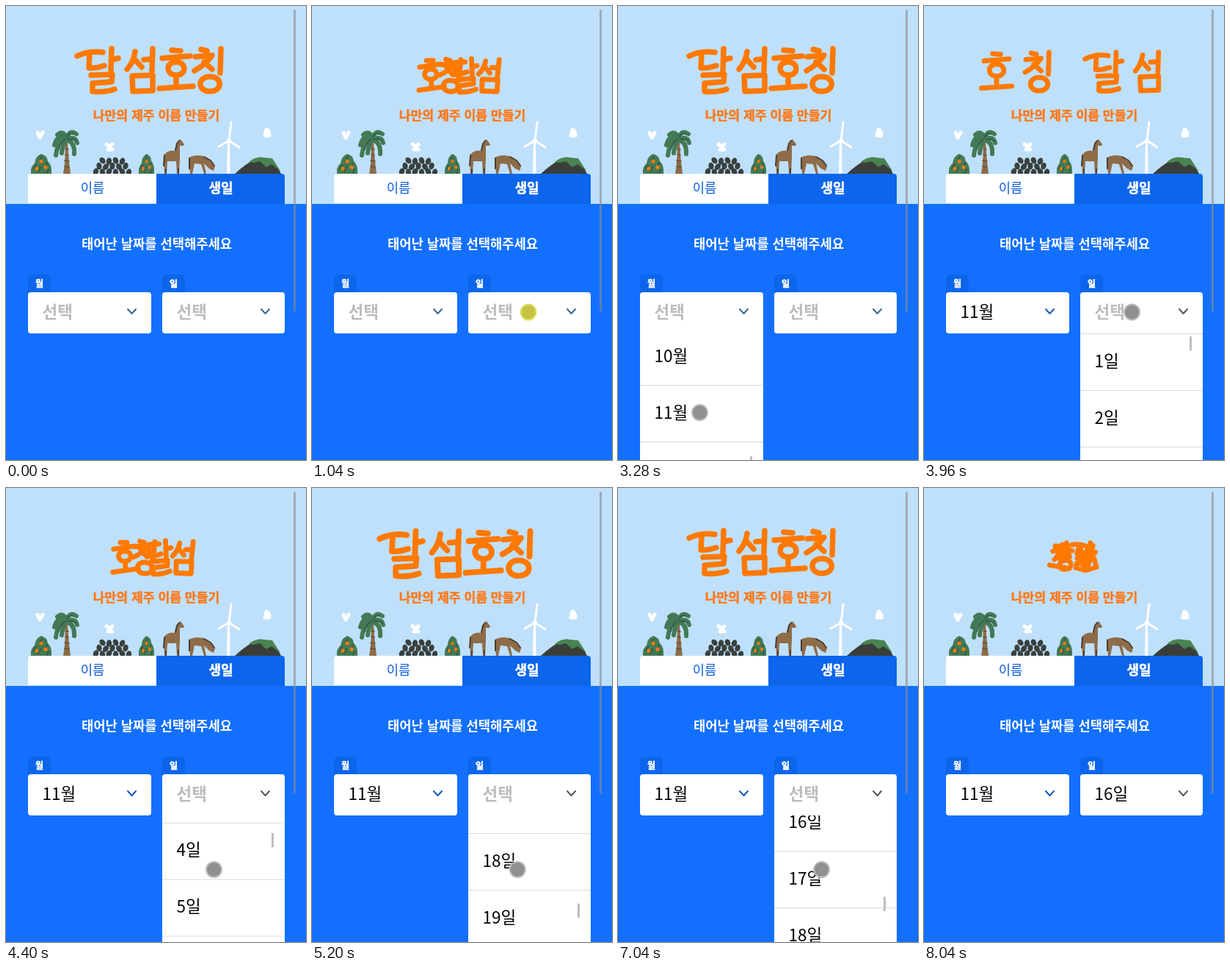
Animation, 409 px wide and 617 px high, one loop 8.24 s. Source, as an HTML page:

```html
<!DOCTYPE html>
<html lang="ko">
<head>
<meta charset="utf-8">
<title>나만의 제주 이름 만들기</title>
<style>
  html, body { margin: 0; height: 100%; overflow: hidden; background: #1370ff; }
  svg { display: block; width: 100vw; height: 100vh; }
  text {
    font: 500 22.5px 'Noto Sans CJK KR', 'Noto Sans CJK JP', 'Noto Sans CJK', sans-serif;
    dominant-baseline: central;
  }
  .mid { text-anchor: middle; }
  .heavy { font-weight: 900; stroke-width: .5; }
  .label { font-size: 12px; fill: #fff; stroke: #fff; }
  .line { fill: none; stroke-linecap: round; stroke-linejoin: round; }
</style>
</head>
<body>
<svg viewBox="0 0 409 617" preserveAspectRatio="none">
  <defs>
    <clipPath id="below"><rect y="445" width="409" height="172"/></clipPath>
    <g id="bush">
      <path fill="#437a55" d="M0 27Q-1 17 5 13Q6 3 14 0Q22 2 23 10Q29 15 28 27Z"/>
      <path class="line" stroke="#315c46" stroke-width="2" d="M7 15l-3 5M15 4l-3 5M22 12l-2 6M13 18l-3 6M24 21l-2 5"/>
      <g fill="#ff7a0a">
        <circle cx="14" cy="10" r="2.6"/><circle cx="8" cy="20" r="2.6"/><circle cx="20" cy="18" r="2.6"/>
      </g>
    </g>
  </defs>

  <rect width="409" height="269" fill="#bfe0fb"/>
  <g id="title" class="line" stroke="#ff7900"></g>
  <text class="mid heavy" x="205" y="147.500" fill="#ff7a1c" stroke="#ff7a1c" style="font-size:17.200px">나만의 제주 이름 만들기</text>

  <g id="scene">
    <g class="line" stroke="#fff" stroke-width="5">
      <path d="M43 172l3 7l4-7"/>
      <path d="M137 188l5 3l3-3M139 195h6"/>
      <path d="M355 168l-2 8h6M357 169l2 4"/>
    </g>
    <use href="#bush" x="34" y="201"/>
    <use href="#bush" transform="translate(181 201) scale(.75 1)"/>
    <path fill="#8b6c48" d="M78 228Q82 205 80 183H84Q85 207 88 228Z"/>
    <path class="line" stroke="#665139" stroke-width="1.500" d="M81 194l4 1M81 202l4 1M80 210l6 1M80 218l6 1"/>
    <path class="line" stroke="#437a55" stroke-width="6"
      d="M82 181Q71 180 68 203M82 180Q70 173 66 189M82 179Q78 168 70 175M83 179Q87 167 96 174M83 181Q95 176 97 186M83 182Q94 185 93 201M82 182Q77 188 76 200"/>
    <path class="line" stroke="#315c46" stroke-width="1.500" d="M81 181Q74 185 72 195M84 181Q91 180 96 184M83 178Q86 172 92 174"/>
    <g id="rocks" fill="#3a403d"></g>
    <path fill="#8e6c48" d="M215 203Q221 195 230 197L233 186L238 181L243 188L242 190L237 190L237 206L236 228H233L232 211H220L219 228H216Z"/>
    <path class="line" stroke="#4c3d32" stroke-width="2" d="M236 183L233 187L231 196M216 203l-1 14M235 221v6M218 222v5"/>
    <path fill="#8e6c48" d="M249 206Q262 200 274 206L285 218L283 224L277 221L270 214L273 228H270L266 215L257 214L254 228H251Z"/>
    <path class="line" stroke="#4c3d32" stroke-width="2" d="M270 205L279 210L284 217M250 207v14"/>
    <path fill="#fff" d="M302 184H305L305.500 228H301Z"/>
    <path class="line" stroke="#fff" stroke-width="3" d="M304 183L307 158M304 183L290 191M304 183L318 192"/>
    <circle cx="304" cy="183" r="3" fill="#fff"/>
    <path fill="#393e3b" d="M312 228Q328 213 344 206Q363 203 375 228Z"/>
    <path fill="#498351" d="M331 212Q341 204 350 206L363 207L374 224L362 215L355 219L346 211L338 213Z"/>
  </g>

  <path fill="#fff" d="M30 268V232q0-4 4-4H205V268Z"/>
  <path fill="#0c65eb" d="M205 269V228H376q4 0 4 4V269Z"/>
  <rect y="269" width="409" height="348" fill="#1370ff"/>
  <text class="mid" x="118" y="245.500" fill="#0c5cdc" style="font-size:17.700px">이름</text>
  <text class="mid heavy" x="293" y="245.500" fill="#fff" stroke="#fff" style="font-size:18px">생일</text>
  <text class="mid" x="205.500" y="321.500" fill="#fff" style="font-size:17.700px;font-weight:700">태어난 날짜를 선택해주세요</text>

  <g id="fields"></g>
  <rect x="392" y="5" width="3" height="410" rx="1" fill="#8a8a8a" opacity=".6"/>
  <circle id="dot" r="10.500" stroke-width="2"/>
</svg>

<script>
const LOOP = 8240, TITLE_LOOP = 3350;
const ROW = 77, LIST_TOP = 446, LIST_HEIGHT = 215;
const $ = id => document.getElementById(id);

function add(parent, tag, attrs, text = '') {
  const node = document.createElementNS('http://www.w3.org/2000/svg', tag);
  set(node, attrs);
  node.textContent = text;
  return parent.appendChild(node);
}
function set(node, attrs) {
  for (const key in attrs) node.setAttribute(key, attrs[key]);
}
const smooth = u => u * u * (3 - 2 * u);
const linear = u => u;

// Keys are [time, ...values]; values between two keys are blended.
function track(t, keys, ease = smooth) {
  if (t <= keys[0][0]) return keys[0].slice(1);
  const i = keys.findIndex(key => key[0] > t);
  if (i < 0) return keys.at(-1).slice(1);
  const a = keys[i - 1], b = keys[i];
  const u = ease((t - a[0]) / (b[0] - a[0]));
  return a.slice(1).map((v, k) => v + (b[k + 1] - v) * u);
}

// Brush lettering: 달 섬 호 칭, each in a 50 x 60 cell
const letters = [
  'M-10 10Q6 2 25 5M7 7L6 26Q16 27 27 23M37 0L36 30M37 15L46 13M9 36L38 35L37 45L11 47L11 58Q27 60 41 55',
  'M15 4Q13 18 4 28M14 14L24 25M27 15L37 14M39 0L38 30M11 37L12 58L39 57L39 36Z',
  'M19 2L31 3M6 13L44 10M25 18C10 18 11 36 25 36C40 36 39 18 25 18M25 40L25 51M2 54L48 51',
  'M13 1L21 3M5 11L28 9Q20 21 4 30M17 18L28 28M40 0L39 33M25 38C7 38 8 59 26 58C43 57 42 38 25 38'
].map(d => add($('title'), 'path', { d }));

// x of each letter, then y, scale, turn, stroke
const home = [132, 186, 232, 278, 88, 1, 0, 7.5];
const near = [238, 288, 123, 172, 90, .88, 0, 7.5];
const heap = [210, 243, 162, 190, 95, .76, -4, 9];
const knot = [219, 223, 188, 190, 94, .6, 14, 11];
const spread = (k, y) => [...home.slice(0, 4).map(x => 198 + (x - 198) * k), y, k, 0, 7.5];
const titleKeys = [
  [440, ...home],
  [620, 252, 308, 98, 156, 90, .9, 0, 7.5],
  [880, ...near], [1020, ...near],
  [1040, ...heap], [1120, ...heap],
  [1220, ...knot], [1540, ...knot],
  [1800, ...spread(1.05, 90)],
  [2360, ...spread(.95, 92)],
  [2600, ...home]
];

function drawTitle(t) {
  const pose = track(t % TITLE_LOOP, titleKeys);
  const [y, scale, turn, stroke] = pose.slice(4);
  letters.forEach((letter, i) => set(letter, {
    transform: `translate(${pose[i]} ${y}) rotate(${i % 2 ? -turn : turn}) scale(${scale}) translate(-25 -30)`,
    'stroke-width': stroke
  }));
}

[4, 5, 6].forEach((count, row) => {
  for (let i = 0; i < count; i++) {
    const x = 145 + (i - (count - 1) / 2) * 9, y = 210 + row * 7.5 + i % 2;
    add($('rocks'), 'ellipse', { cx: x, cy: y, rx: 3.6, ry: 4.8, transform: `rotate(${(i * 47 + row * 30) % 80 - 40} ${x} ${y})` });
  }
});

function makeField({ x, width, unit, count, ...timing }) {
  const root = $('fields'), right = x + width;
  add(root, 'path', { d: `M${x} 390V371q0-6 6-6h19q6 0 6 6V390Z`, fill: '#0c65eb' });
  add(root, 'text', { x: x + 15.5, y: 376, class: 'mid heavy label' }, unit);
  add(root, 'rect', { x, y: 389, width, height: 56, rx: 4, fill: '#fff' });
  const list = add(root, 'g', { 'clip-path': 'url(#below)' });
  add(list, 'rect', { x, y: 440, width, height: 180, fill: '#fff' });
  const join = add(root, 'rect', { x, y: 438, width, height: 7, fill: '#fff' });
  const rows = add(list, 'g', {});
  for (let i = 0; i <= count; i++) {
    const y = LIST_TOP + i * ROW;
    add(rows, 'rect', { x, y: y - 1, width, height: 1, fill: '#d9d9d9' });
    if (i < count) add(rows, 'text', { x: x + 19.5, y: y + 34.5 }, i + 1 + unit);
  }
  const ratio = LIST_HEIGHT / (count * ROW);
  const thumb = add(list, 'rect', { x: right - 18, width: 3, height: LIST_HEIGHT * ratio, fill: '#bdbdbd' });
  const value = add(root, 'text', { x: x + 19.5, y: 413.5 });
  const arrow = add(root, 'path', { class: 'line', d: `M${right - 32} 412l5.500 6l5.500-6`, 'stroke-width': 2 });
  return { ...timing, unit, list, join, rows, ratio, thumb, value, arrow };
}

const fields = [
  makeField({
    x: 30, width: 168, unit: '월', count: 12, open: 1900, close: 3560, choice: 11,
    arrowKeys: [[0, '#3f678c'], [3560, '#1a55b8']],
    scroll: [[2380, 0], [3040, 660], [3280, 700]]
  }),
  makeField({
    x: 213, width: 167, unit: '일', count: 31, open: 3960, close: 7300, choice: 16,
    arrowKeys: [[0, '#3f678c'], [3960, '#555']],
    scroll: [[4240, 0], [4400, 220], [5080, 1150], [5920, 2086], [6320, 2086], [7120, 1085]]
  })
];

function drawField(f, t) {
  const isOpen = t >= f.open && t < f.close, chosen = t >= f.close;
  const [scroll] = track(t, f.scroll, linear);
  const display = isOpen ? 'inline' : 'none';
  set(f.list, { display });
  set(f.join, { display });
  set(f.rows, { transform: `translate(0 ${-scroll})` });
  set(f.thumb, { y: LIST_TOP + 3 + scroll * f.ratio });
  f.value.textContent = chosen ? f.choice + f.unit : '선택';
  f.value.style.fontWeight = chosen ? 500 : 700;
  set(f.value, { fill: chosen ? '#000' : '#bcbcbc' });
  set(f.arrow, { stroke: f.arrowKeys.findLast(key => t >= key[0])[1] });
}

const dotKeys = [
  [440, 381, 528], [880, 295, 416], [1400, 295, 416], [1760, 115, 416], [1920, 115, 416],
  [2200, 121.5, 496.5], [2380, 121.5, 496.5], [3200, 111.5, 552.5], [3600, 111.5, 552.5],
  [3880, 283.5, 416], [3980, 283.5, 416], [4200, 283.5, 518.5], [4400, 283.5, 518.5],
  [5900, 277.5, 518.5], [7040, 277.5, 518.5], [7160, 280, 552], [7640, 280, 552], [7880, 341, 640]
];

function drawDot(t) {
  const [cx, cy] = track(t, dotKeys);
  const early = t < 1760;
  set($('dot'), {
    cx, cy,
    display: t >= 440 && t < 7880 ? 'inline' : 'none',
    fill: early ? '#c4c344' : '#909090',
    stroke: early ? '#dfe064' : '#bdbdbd'
  });
}

function frame(now) {
  const t = now % LOOP;
  drawTitle(t);
  fields.forEach(f => drawField(f, t));
  drawDot(t);
  requestAnimationFrame(frame);
}
requestAnimationFrame(frame);
</script>
</body>
</html>
```
